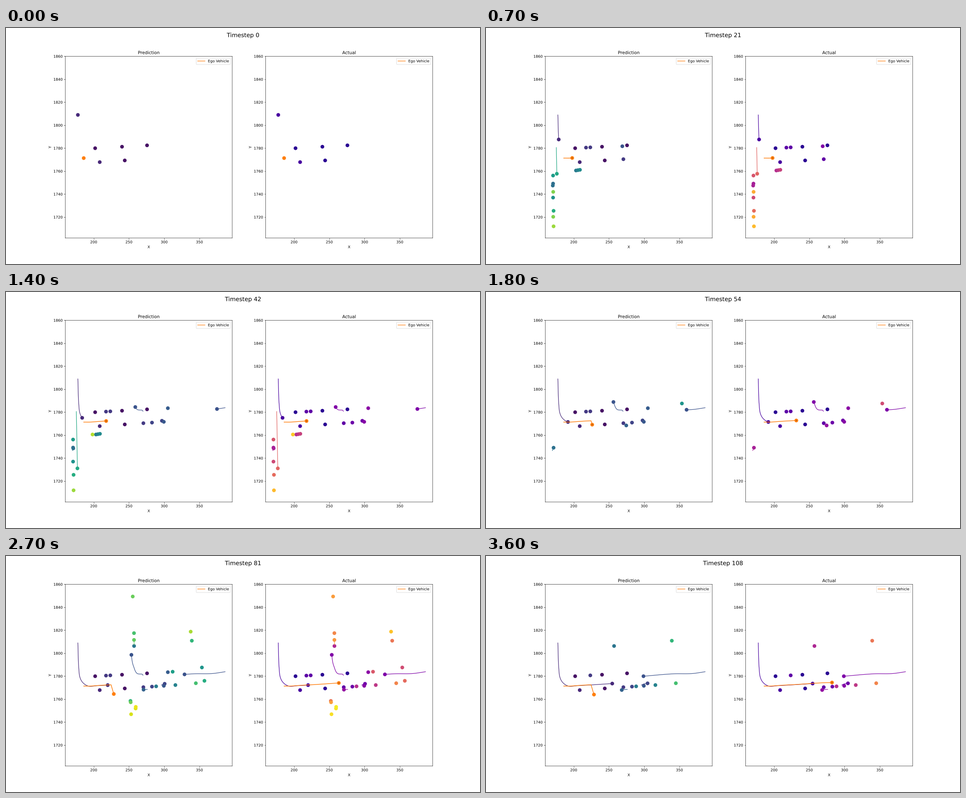
Recreate the animation shown at these times as a matplotlib script. Size 1058x529 px, loop 3.7 s.

```python
import numpy as np
import matplotlib.pyplot as plt
from matplotlib import patheffects
from matplotlib.animation import FuncAnimation

FRAMES, INTERVAL, STEP = 37, 100, 3
END = (FRAMES - 1) * STEP
ORANGE = "#ff7f0e"
DOT = dict(marker="o", ls="", ms=10.2, mew=0, zorder=1)

# Unsnapped vector drawing: soft text, lines and markers at fractional pixels
plt.rcParams.update({"path.snap": False, "text.hinting": "no_hinting",
                     "path.effects": [patheffects.Normal()]})

cars = []


def car(shade, first, last, *keys):
    """Keys are (timestep, x, y)."""
    cars.append((shade, first, last, np.array(keys, float)))


def spot(shade, first, last, x, y):
    car(shade, first, last, (0, x, y))


def path(keys, t):
    """Smooth curve through timed points."""
    t = np.atleast_1d(t).astype(float)
    if len(keys) == 1:
        return np.repeat(keys[:, 1:], len(t), axis=0)
    times, pts = keys[:, 0], keys[:, 1:]
    slope = np.gradient(pts, times, axis=0)
    t = np.clip(t, times[0], times[-1])
    i = np.clip(np.searchsorted(times, t, side="right") - 1, 0, len(times) - 2)
    span = (times[i + 1] - times[i])[:, None]
    u = (t - times[i])[:, None] / span
    return ((1 + 2 * u) * (1 - u) ** 2 * pts[i] + u * (1 - u) ** 2 * span * slope[i]
            + u * u * (3 - 2 * u) * pts[i + 1] + u * u * (u - 1) * span * slope[i + 1])


def arrival_shade(t):
    return 0.165 + 7e-5 * t * t if t else 0.05


def north_curb(first, last, *xs):
    for x in xs:
        spot(arrival_shade(first), first, last, x, 1780 + 0.034 * (x - 202))


def south_curb(first, *xs):
    for x in xs:
        spot(arrival_shade(first), first, END, x, 1767.9 + 0.041 * (x - 208.5))


# Cars parked along both curbs
north_curb(0, END, 202.1, 240.2, 275.7)
north_curb(6, 96, 217.5)
north_curb(9, END, 223.6)
north_curb(42, 96, 305.2)
spot(0.56, 63, 96, 312, 1783.9)
spot(0.11, 0, END, 208.6, 1767.9)
south_curb(0, 244.1)
south_curb(12, 270.5)
south_curb(24, 282.7)
south_curb(39, 299.5)
south_curb(60, 288.6)
south_curb(63, 315.9)

# Turning in from the north
car(0.12, 0, END, (0, 177.6, 1809), (21, 178.8, 1787.6), (33, 180.4, 1779.3),
    (42, 183.7, 1775.1), (54, 191.9, 1771.5), (69, 206.2, 1771.8), (108, 254.7, 1773.6))
# Westbound from the far right
car(0.25, 33, END, (33, 386.4, 1783.9), (45, 371.1, 1782.5),
    (69, 342.5, 1782.1), (108, 299, 1780))
# Pulling out and heading north
car(0.26, 15, 90, (15, 269.9, 1780.8), (21, 269, 1781.7), (33, 262.2, 1782.2),
    (54, 256.4, 1788.9), (90, 252.8, 1801.9))
# Slow movers and the fast southbound one
car(0.21, 27, END, (33, 296.1, 1772.3), (69, 299.1, 1773.2), (108, 304.8, 1773.8))
car(0.31, 45, END, (45, 276.1, 1768.5), (69, 272.2, 1768.4), (108, 268.2, 1768))
car(0.6, 3, 45, (3, 175.4, 1780.6), (45, 177.1, 1727.3))

# South-west column
for shade, y in zip((0.55, 0.36, 0.51, 0.62, 0.85), (1756.2, 1749.2, 1737, 1725.5, 1712)):
    spot(shade, 6, 45, 171.5 - (y > 1730) * 0.7, y)
for y in (1742, 1720.3):
    spot(0.81, 9, 27, 171, y)
car(0.37, 3, 60, (3, 169.8, 1746.6), (54, 171.5, 1749.1))

# Small group south of the road
for k in range(3):
    spot(0.41 + 0.035 * k, 6, 45, 203.3 + 2.8 * k, 1760.6 + 0.3 * k)
spot(0.89, 27, 42, 198.4, 1760.6)
spot(0.74, 27, 39, 207.3, 1784.3)

# Crossing street
spot(0.39, 60, END, 257.3, 1806.3)
spot(0.71, 60, 96, 257.2, 1817.5)
spot(0.77, 63, 93, 255.4, 1849.4)
car(0.76, 72, 93, (72, 257.4, 1807.4), (93, 257, 1817.2))
spot(0.66, 60, 99, 252.2, 1758.5)
spot(0.78, 60, 87, 252.5, 1757.3)
for k in range(2):
    spot(0.95 + 0.02 * k, 60, 87, 259.5 + 0.2 * k, 1751.9 + 1.4 * k)
car(0.94, 63, 87, (69, 253.2, 1748), (81, 253.1, 1746.9))

# East side
spot(0.52, 48, 96, 353.5, 1787.6)
spot(0.62, 66, 99, 357.1, 1776)
spot(0.66, 72, END, 339.2, 1810.9)
spot(0.7, 72, END, 344.9, 1773.9)
spot(0.87, 75, 96, 337.6, 1818.8)

cars.sort(key=lambda c: c[0])

EGO = np.array([(0, 185.9, 1771.4), (21, 197.9, 1771.5), (33, 208.2, 1772),
                (54, 231.6, 1772.8), (81, 263.5, 1774.1), (108, 282.2, 1774.5)])
TURN, DRIFT = 48, (4.2, -8.6)


def ego_path(t, predicted):
    if not predicted:
        return path(EGO, t)
    eased = 1 - np.exp(-np.maximum(t - TURN, 0) / 12)
    return path(EGO, np.minimum(t, TURN)) + eased[:, None] * DRIFT


class Panel:
    def __init__(self, ax, title, cmap, predicted):
        self.predicted = predicted
        ax.set(title=title, xlabel="X", ylabel="Y", xlim=(159.7, 396.5), ylim=(1701.8, 1860),
               xticks=range(200, 351, 50), yticks=range(1720, 1861, 20))
        colors = [plt.get_cmap(cmap)(c[0]) for c in cars]
        self.dots = [ax.plot([], [], color=c, **DOT)[0] for c in colors]
        self.trails = [ax.plot([], [], color=c, lw=1.5, zorder=2)[0] for c in colors]
        self.ego_dot, = ax.plot([], [], color=ORANGE, **DOT)
        self.ego_trail, = ax.plot([], [], color=ORANGE, lw=1.8, zorder=3)
        self.core, = ax.plot([], [], "o", color="#3a2010", ms=2, mew=0, zorder=4)
        key, = ax.plot([], [], color=ORANGE, lw=1.5)
        ax.legend([key], ["Ego Vehicle"], loc="upper right")

    def draw(self, t):
        for (_, first, last, keys), dot, trail in zip(cars, self.dots, self.trails):
            shown = first <= t <= last
            dot.set_visible(shown)
            trail.set_visible(shown and len(keys) > 1)
            if shown:
                x, y = path(keys, np.arange(first, t + 1)).T
                dot.set_data(x[-1:], y[-1:])
                trail.set_data(x, y)
        x, y = ego_path(np.arange(t + 1), self.predicted).T
        self.ego_dot.set_data(x[-1:], y[-1:])
        self.ego_trail.set_data(x, y)
        self.core.set_data(x[-1:], y[-1:])
        self.core.set_visible(0 < t <= (72 if self.predicted else END))


fig, axes = plt.subplots(1, 2, figsize=(18, 9), dpi=58.778)
title = fig.suptitle("Timestep 0", fontsize=16)
panels = [Panel(axes[0], "Prediction", "viridis", True),
          Panel(axes[1], "Actual", "plasma", False)]


def update(i):
    t = i * STEP
    title.set_text(f"Timestep {t}")
    for panel in panels:
        panel.draw(t)
    return []


def reset():
    return update(0)


anim = FuncAnimation(fig, update, frames=FRAMES, interval=INTERVAL,
                     init_func=reset, repeat=True, repeat_delay=0, blit=False)
plt.show()
```
